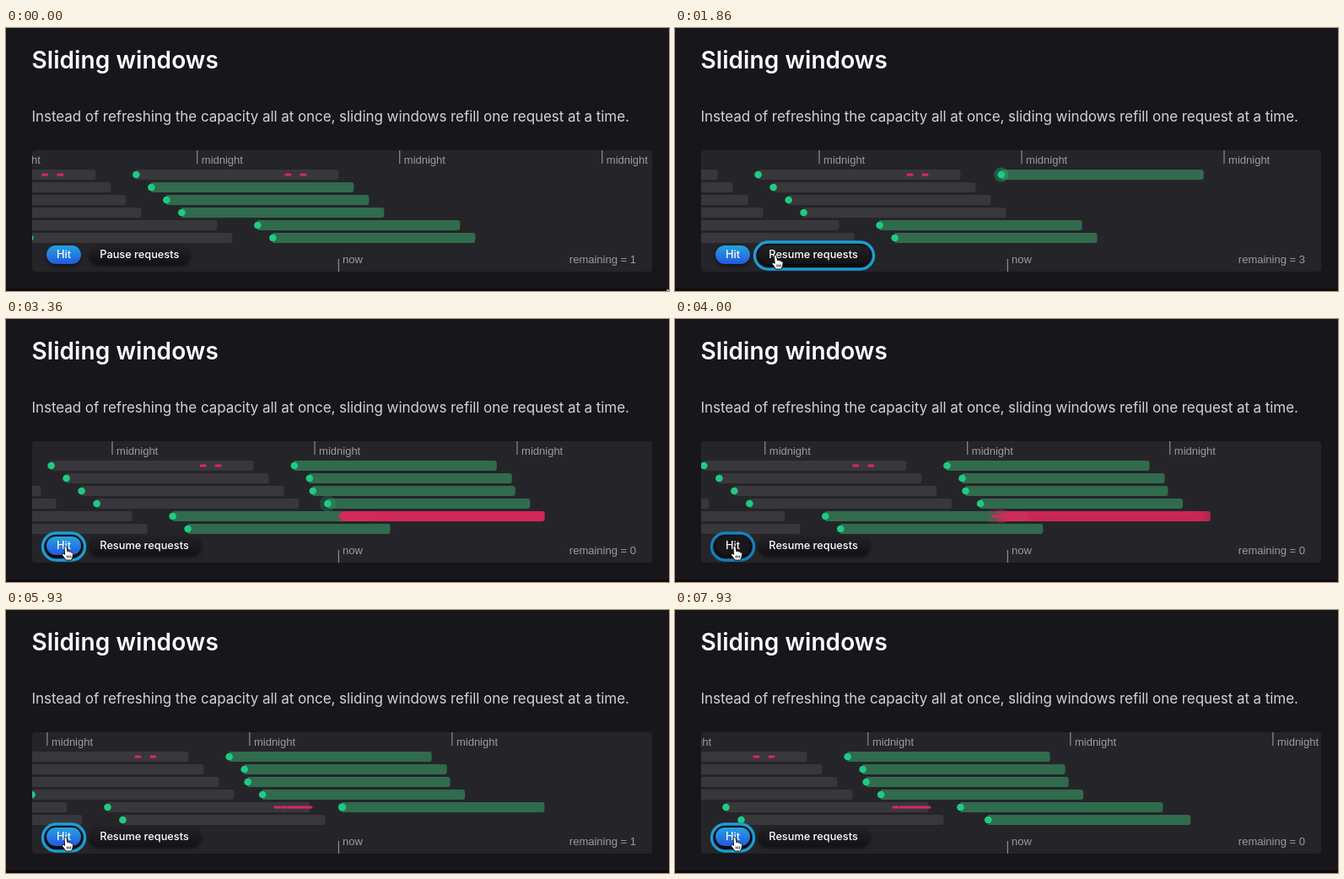
Write an HTML page that moves like this. It is 786 px wide and 312 px high and loops after 8 s.

```html
<!DOCTYPE html>
<html lang="en">
<head>
<meta charset="utf-8">
<title>Sliding windows</title>
<style>
  html, body { margin: 0; width: 100%; height: 100%; overflow: hidden; background: #17161a; }
  svg { display: block; width: 786px; height: 312px; }
  text { font-family: Inter, "Open Sans", sans-serif; font-optical-sizing: none; }
  .small { font: 13px "Liberation Sans", Arial, sans-serif; fill: #9b9b9f; }
  .label { font-size: 12.75px; font-weight: 500; fill: #fff; }
  .tick { fill: #8d8d91; }
  .button { filter: drop-shadow(0 2px 2px rgba(0, 0, 0, .6)); }
  .ring { fill: #141317; stroke: #1c9fd6; stroke-width: 3.4; }
</style>
</head>
<body>
<svg viewBox="0 0 786 312" xmlns="http://www.w3.org/2000/svg">
  <defs>
    <linearGradient id="blue" x2="0" y2="1">
      <stop stop-color="#24a4df"/><stop offset="1" stop-color="#2458df"/>
    </linearGradient>
    <linearGradient id="dark" x2="0" y2="1">
      <stop stop-color="#222126"/><stop offset="1" stop-color="#131217"/>
    </linearGradient>
    <clipPath id="panel"><rect x="31" y="145" width="735" height="144" rx="4"/></clipPath>
  </defs>
  <rect width="786" height="312" fill="#17161a"/>
  <rect y="309" width="786" height="3" fill="#100a0f"/>
  <text x="30.5" y="48" font-size="28" font-weight="600" letter-spacing=".07" fill="#fff">Sliding windows</text>
  <text x="30.5" y="111" font-size="17" letter-spacing="-.065" fill="#d2d1d5">Instead of refreshing the capacity all at once, sliding windows refill one request at a time.</text>

  <g clip-path="url(#panel)">
    <rect x="31" y="145" width="735" height="144" fill="#252529"/>
    <g id="world"></g>
    <rect class="tick" x="393.8" y="274" width="1.2" height="15"/>
    <text class="small" x="399" y="279">now</text>
    <text class="small" id="remaining" x="747" y="279" text-anchor="end"></text>
  </g>

  <rect class="ring" id="hitRing" x="43.5" y="254" width="50" height="32" rx="16"/>
  <rect class="ring" id="pauseRing" x="94.5" y="254" height="32" rx="16"/>
  <rect class="button" id="hit" x="48" y="258" width="41" height="22" rx="11"/>
  <text class="label" x="68.5" y="273" text-anchor="middle">Hit</text>
  <rect class="button" id="pause" x="99" y="258" height="22" rx="11" fill="url(#dark)"/>
  <text class="label" id="pauseLabel" x="111.3" y="273"></text>

  <g id="cursor">
    <path id="arrow" d="M0 0V15L3.6 11.7 6 17 8.6 15.8 6.3 10.8H11Z" fill="#000" stroke="#fff"/>
    <path id="hand" d="M-2 1C-2-1 1-1 1 1L2 6C2.5 4.5 4.3 4.8 4.3 6.3 5 5.4 6.6 5.8 6.6 7.2 7.4 6.6 8.7 7.2 8.6 8.6L8 12.5 6.6 16H0L-4.2 10.2C-5.2 8.4-3 7.6-1.4 9.4Z M1.5 10.5V13.5M3.6 10.5V13.5M5.7 10.5V13.5" fill="#fff" stroke="#000" stroke-width=".9" stroke-linejoin="round"/>
  </g>
</svg>
<script>
const LOOP = 8000, FRAME = 1000 / 14;
const SPEED = 30;          // px per second
const ORIGIN = .8;         // world offset at time 0
const ARRIVAL = 399;       // x at which requests arrive and expire
const WINDOW = 240, CAPACITY = 6, CYCLE = 288;
const GREEN = '#1ecb83', RED = '#dc285c';
const PAUSED_AT = 1.8, FOCUS_HIT_AT = 2.1;

const $ = id => document.getElementById(id);
const world = $('world');
const set = (node, attrs) => {
  for (const key in attrs) node.setAttribute(key, attrs[key]);
  return node;
};
const add = (name, attrs) =>
  world.appendChild(set(document.createElementNS('http://www.w3.org/2000/svg', name), attrs));
const show = (node, visible) => set(node, { visibility: visible ? 'visible' : 'hidden' });
const timeAt = x => (x - ARRIVAL) / SPEED;
const rowY = row => 174 + 15 * row;

for (let x = -14; x < 1000; x += 240) {
  add('rect', { class: 'tick', x: x - .7, y: 145, width: 1.2, height: 16 });
  add('text', { class: 'small', x: x + 5, y: 161 }).textContent = 'midnight';
}

const bar = (row, x, fill) =>
  add('path', { d: `M${x} ${rowY(row) - 6}h${WINDOW - 3}q3 0 3 3v6q0 3 -3 3h${3 - WINDOW}z`, fill });
const halo = (row, x, fill) => add('circle', { cx: x, cy: rowY(row), fill });

const first = [153.5, 171.5, 189.5, 207.5, 297.5, 315.5];
const latest = [441.7, 459.7, 463.7, 481.2, 575.5, 608.3];
const accepted = [first.map(x => x - CYCLE), first, latest].flatMap(list =>
  list.map((x, row) => ({
    start: timeAt(x),
    end: timeAt(x + WINDOW),
    bar: bar(row, x),
    halo: halo(row, x, GREEN),
    dot: add('circle', { cx: x, cy: rowY(row), r: 4.3, fill: GREEN })
  })));

const manualRejects = [498.5, 506.5, 514, 519.5, 525.5, 531, 536.5];
const rejects = [45.5, 63.5, 333.5, 351.5].map(x => [0, x])
  .concat(manualRejects.map(x => [4, x]));
const rejected = rejects.map(([row, x]) => ({
  start: timeAt(x),
  bar: bar(row, x, RED),
  halo: halo(row, x, RED),
  dash: add('rect', { x: x - 4, y: rowY(row) - 1.5, width: 8, height: 3, rx: 1.5, fill: RED })
}));
const clicks = [...latest.slice(2), ...manualRejects].map(timeAt);

// time, x, y
const cursorPath = [[.93, 112, 312], [1.07, 108, 307], [1.55, 122, 272], [1.85, 121, 270], [2.1, 71, 270]];

function cursorAt(t) {
  if (t < .07) return [784, 310];
  if (t < cursorPath[0][0]) return null;
  const i = cursorPath.findIndex(point => point[0] > t);
  if (i < 0) return cursorPath.at(-1).slice(1);
  const [t0, x0, y0] = cursorPath[i - 1], [t1, x1, y1] = cursorPath[i];
  const p = (t - t0) / (t1 - t0);
  return [x0 + (x1 - x0) * p, y0 + (y1 - y0) * p];
}

function pulse(node, age) {
  const p = Math.min(1, Math.max(0, age / .9));
  set(node, { r: 4.3 + 6 * (1 - (1 - p) ** 2), opacity: age < 0 ? 0 : .6 * (1 - p) });
}

function drawRequests(t) {
  set(world, { transform: `translate(${ORIGIN - SPEED * t})` });
  let active = 0;
  for (const item of accepted) {
    const arrived = t >= item.start, live = arrived && t < item.end;
    active += live;
    show(set(item.bar, { fill: live ? '#306b4d' : '#38383c' }), arrived);
    show(item.dot, arrived);
    pulse(item.halo, t - item.start);
  }
  for (const item of rejected) {
    const age = t - item.start;
    set(item.bar, { opacity: age < 0 ? 0 : Math.max(0, 1 - age / .8) });
    show(item.dash, age >= 0);
    pulse(item.halo, age);
  }
  $('remaining').textContent = `remaining = ${CAPACITY - active}`;
}

function drawControls(t) {
  const paused = t >= PAUSED_AT, width = paused ? 132 : 119;
  const pressed = clicks.some(click => t >= click - .09 && t < click);
  $('pauseLabel').textContent = paused ? 'Resume requests' : 'Pause requests';
  set($('pause'), { width });
  set($('pauseRing'), { width: width + 9 });
  show($('pauseRing'), paused && t < FOCUS_HIT_AT);
  show($('hitRing'), t >= FOCUS_HIT_AT);
  set($('hitRing'), { style: pressed ? 'stroke:#1482bd' : '' });
  set($('hit'), { fill: pressed ? '#18171b' : 'url(#blue)' });

  const point = cursorAt(t);
  const overButton = point && point[1] < 280;
  show($('arrow'), point && !overButton);
  show($('hand'), overButton);
  if (point) set($('cursor'), { transform: `translate(${point})` });
}

function draw() {
  const elapsed = performance.now() % LOOP;
  const t = Math.floor((elapsed + 5) / FRAME) * FRAME / 1000;
  drawRequests(t);
  drawControls(t);
  requestAnimationFrame(draw);
}
draw();
</script>
</body>
</html>
```
